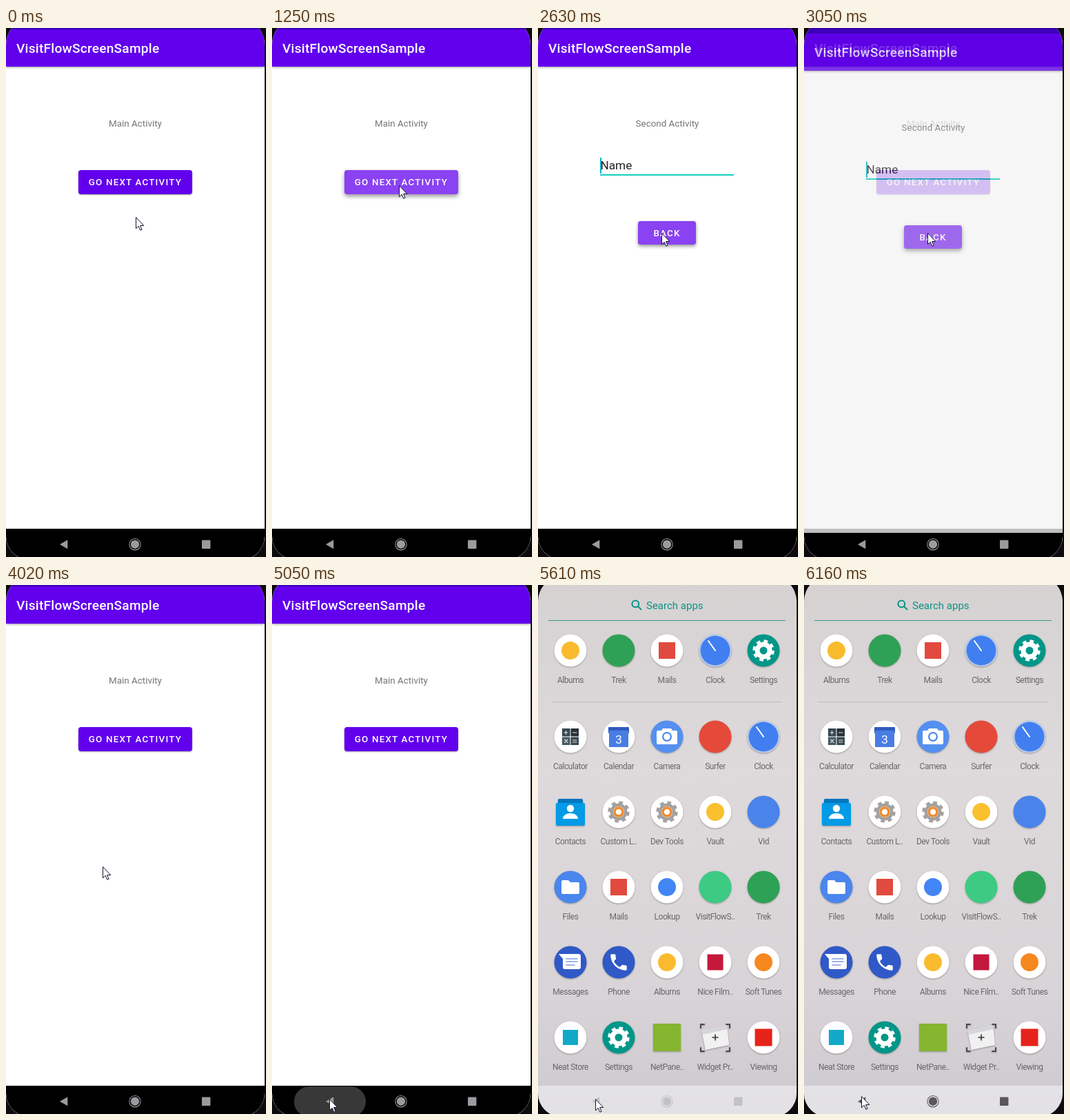
An HTML page for the animation above (6.49 s loop, 377x767 px).

```html
<!DOCTYPE html>
<html lang="en">
<head>
<meta charset="utf-8">
<title>Screen transition</title>
<style>
  :root { --loop: 6490ms; }
  html, body { margin: 0; width: 100%; height: 100%; overflow: hidden; background: #0d0b0e; }
  body { position: relative; font-family: Roboto, "Noto Sans", sans-serif; }
  #screen, .layer { position: absolute; left: 0; top: 0; width: 377px; height: 767px; }
  #screen { clip-path: inset(-14px 2px -4px 0 round 38px 38px 34px 34px); }

  /* launcher */
  #launcher { background: linear-gradient(#d6d2d2, #ded9db 35%, #d9d4d7 75%, #cdcad0); }
  #launcher text { font-family: Roboto, "Noto Sans", sans-serif; }
  .label { font-size: 12px; letter-spacing: -.45px; fill: #6a6769; text-anchor: middle; }
  .icon { filter: drop-shadow(0 1px 1px rgba(0, 0, 0, .3)); }

  /* app windows */
  #task { position: absolute; left: 0; top: -20px; width: 375px; height: 787px;
    animation: leave var(--loop) step-end infinite; }
  .window { position: absolute; inset: 0; background: #fff; }
  .window > * { position: absolute; }
  .status { inset: 0 0 auto; height: 22px; background: #3700b3; }
  .bar { inset: 22px 0 auto; height: 54px; padding-left: 15px; background: #6200ee; color: #fff;
    font: 500 19.1px/56px Roboto, "Noto Sans", sans-serif; letter-spacing: .0125em;
    box-shadow: 0 1px 3px rgba(0, 0, 0, .42); }
  .base { inset: 746px 0 0; background: #000; }
  .caption { left: 0; right: 0; top: 148px; text-align: center; color: #757577; font-size: 13.4px; line-height: 21px; }
  .btn { height: 34.6px; border-radius: 4px; background: #6200ee; color: #fff; text-align: center;
    font: 500 13.4px/35px Roboto, "Noto Sans", sans-serif; letter-spacing: .0893em;
    overflow: hidden; isolation: isolate; box-shadow: 0 1px 2px rgba(0, 0, 0, .4);
    animation: lift var(--loop) linear var(--wait, 0ms) infinite; }
  .btn::before { content: ""; position: absolute; z-index: -1; left: var(--x); top: var(--y);
    width: 190px; height: 190px; margin: -95px; border-radius: 50%; background: rgba(255, 255, 255, .26);
    animation: ripple var(--loop) linear var(--wait, 0ms) infinite; }
  #next { left: 104.7px; top: 226.2px; width: 165.3px; --x: 80px; --y: 22px; }
  #back { left: 145px; top: 299.8px; width: 84px; --x: 34px; --y: 17px; --wait: -4730ms; }
  .field { left: 90px; top: 207px; width: 194px; height: 25px; border-bottom: 2px solid #12d0bd;
    color: #232126; font-size: 17.2px; line-height: 25px; text-indent: .5px; }
  .caret { left: 90px; top: 208px; width: 2px; height: 23px; background: #03b5c5;
    animation: caret var(--loop) step-end infinite; }
  .dim { inset: 0; background: #000; animation: dim var(--loop) step-end infinite; }
  #second { animation: second var(--loop) step-end infinite; }

  /* navigation keys and pointer */
  #keys { color: #9d9a9f; animation: keys var(--loop) infinite; }
  #touch { position: absolute; left: 32px; top: 727px; width: 104px; height: 44px; border-radius: 22px;
    background: rgba(255, 255, 255, .22); animation: touch var(--loop) linear infinite; }
  #pointer { position: absolute; left: 0; top: 0; width: 14px; height: 22px;
    animation: pointer var(--loop) infinite; }

  @keyframes pointer {
    0% { transform: translate(188px, 274px); animation-timing-function: steps(3); }
    3.08% { transform: translate(184px, 228px); }
    25.57% { transform: translate(184px, 228px); animation-timing-function: steps(4); }
    29.89% { transform: translate(180px, 284px); animation-timing-function: steps(4); }
    34.2% { transform: translate(179px, 297px); }
    55.46% { transform: translate(179px, 297px); animation-timing-function: steps(2); }
    57.62% { transform: translate(165px, 291px); animation-timing-function: steps(4); }
    61.94% { transform: translate(140px, 408px); animation-timing-function: steps(4); }
    66.25% { transform: translate(43px, 640px); animation-timing-function: steps(2); }
    68.41% { transform: translate(93px, 731px); animation-timing-function: steps(1); }
    69.49% { transform: translate(83px, 745px); }
    92.75% { transform: translate(83px, 745px); animation-timing-function: steps(2); }
    94.91%, 100% { transform: translate(83px, 741px); }
  }
  @keyframes ripple {
    0%, 10.16% { opacity: 0; transform: scale(.25); }
    10.17% { opacity: 1; transform: scale(.25); animation-timing-function: steps(6); }
    16.6%, 20.33% { opacity: 1; transform: none; }
    24.65%, 100% { opacity: 0; transform: none; }
  }
  @keyframes lift {
    0%, 10.16% { box-shadow: 0 1px 2px rgba(0, 0, 0, .4); }
    14.5%, 20.33% { box-shadow: 0 3px 6px rgba(0, 0, 0, .42); }
    24.65%, 100% { box-shadow: 0 1px 2px rgba(0, 0, 0, .4); }
  }
  @keyframes second {
    0% { opacity: 0; transform: translateY(16px); }
    20.33% { opacity: .35; transform: translateY(16px); }
    21.41% { opacity: .7; transform: translateY(9px); }
    22.49% { opacity: .92; transform: translateY(4px); }
    23.57% { opacity: 1; transform: translateY(1px); }
    24.65% { opacity: 1; transform: none; }
    46.99% { opacity: .75; transform: translateY(6px); }
    48.07% { opacity: .5; transform: translateY(14px); }
    49.15% { opacity: .27; transform: translateY(24px); }
    50.23% { opacity: .1; transform: translateY(33px); }
    51.3%, 100% { opacity: 0; transform: translateY(61px); }
  }
  @keyframes dim {
    0% { opacity: 0; }
    20.33% { opacity: .08; }
    22.49% { opacity: .2; }
    46.99% { opacity: .15; }
    48.07% { opacity: .1; }
    49.15% { opacity: .05; }
    51.3%, 100% { opacity: 0; }
  }
  @keyframes caret {
    0% { opacity: 0; }
    40.36%, 100% { opacity: 1; }
  }
  @keyframes touch {
    0%, 72.56% { opacity: 0; transform: scale(.3); }
    72.57% { opacity: 1; transform: scale(.3); animation-timing-function: steps(4); }
    76.88%, 78% { opacity: 1; transform: none; }
    82.12%, 100% { opacity: 0; transform: none; }
  }
  @keyframes keys {
    0% { color: #9d9a9f; }
    81.04% { color: #9d9a9f; animation-timing-function: steps(3); }
    84.28% { color: #f7f7f7; animation-timing-function: steps(6); }
    90.75%, 100% { color: #5a5859; }
  }
  @keyframes leave {
    0% { opacity: 1; transform: none; }
    83.2% { opacity: 1; transform: translateY(52px); }
    84.28% { opacity: 1; transform: translateY(98px); }
    85.36% { opacity: .5; transform: translateY(108px); }
    86.44%, 100% { opacity: 0; transform: translateY(110px); }
  }
</style>
</head>
<body>
<div id="screen">
  <svg id="launcher" class="layer" viewBox="0 0 377 767">
    <g fill="none" stroke="#009688" stroke-width="2">
      <circle cx="141.3" cy="27.3" r="4.9"/>
      <path d="M145 31L150 36"/>
      <path d="M15 51.5H359" stroke="#3f958c" stroke-width="1.2"/>
    </g>
    <text x="157" y="35.3" font-size="15" fill="#0b9286">Search apps</text>
    <path d="M20 169.5H354" stroke="#c2bdc0"/>
    <rect y="726" width="377" height="41" fill="#fff" opacity=".42"/>
    <g id="grid"></g>
  </svg>

  <div id="task">
    <div class="window">
      <div class="base"></div>
      <div class="bar">VisitFlowScreenSample</div>
      <div class="status"></div>
      <div class="caption">Main Activity</div>
      <div class="btn" id="next">GO NEXT ACTIVITY</div>
      <div class="dim"></div>
    </div>
    <div class="window" id="second">
      <div class="base"></div>
      <div class="bar">VisitFlowScreenSample</div>
      <div class="status"></div>
      <div class="caption">Second Activity</div>
      <div class="field">Name</div>
      <div class="caret"></div>
      <div class="btn" id="back">BACK</div>
    </div>
  </div>

  <div id="touch"></div>
  <svg id="keys" class="layer" viewBox="0 0 377 767" fill="currentColor">
    <path d="M78 748.8L89.3 742.3V755.3Z"/>
    <circle cx="187" cy="748.7" r="6.2"/>
    <circle cx="187" cy="748.7" r="8.2" fill="none" stroke="currentColor" stroke-width="1.1"/>
    <rect x="284" y="742.6" width="12.4" height="12.4" rx="1"/>
  </svg>
  <svg id="pointer" viewBox="0 0 14 22">
    <path d="M.5 .6V16.8L4.2 13.3L6.8 19.3L9.1 18.3L6.6 12.5H11.8Z" fill="#fff" stroke="#15122c"/>
  </svg>
</div>

<script>
  const disc = (fill, r = 23.5) => `<circle r="${r}" fill="${fill}"/>`;
  const box = (x, y, w, h, fill, rx = 0) =>
    `<rect x="${x}" y="${y}" width="${w}" height="${h}" rx="${rx}" fill="${fill}"/>`;
  const path = (d, fill) => `<path d="${d}" fill="${fill}"/>`;
  const line = (d, color, w = 1.5) =>
    `<path d="${d}" fill="none" stroke="${color}" stroke-width="${w}" stroke-linecap="round"/>`;
  const ring = (r, color, w, dash = "none") =>
    `<circle r="${r}" fill="none" stroke="${color}" stroke-width="${w}" stroke-dasharray="${dash}"/>`;
  const gear = color => ring(9, color, 7) + ring(13.5, color, 4.5, "5.6 5");
  const dot = (color, r = 13) => disc("#fff") + disc(color, r);
  const tile = (color, s = 24) => disc("#fff") + box(-s / 2, -s / 2, s, s, color);

  const clock = disc("#b9cbea") + disc("#417ff0", 21.5) + line("M-10 -14L0 0", "#fff", 2);
  const settings = disc("#009688") + gear("#fff");
  const tools = disc("#fff") + gear("#a3a1a0") + disc("#fff", 8) + ring(6, "#ef8a2c", 3.5);
  const calculator = disc("#fff") + box(-12, -12, 11.5, 11.5, "#37474f") + box(.5, -12, 11.5, 11.5, "#263238") +
    box(-12, .5, 11.5, 11.5, "#455a64") + box(.5, .5, 11.5, 11.5, "#37474f") +
    line("M-9 -6H-4M-6.5 -8.5V-3.5M3.5 -6H9M-8.5 4L-4 8.5M-4 4L-8.5 8.5M3.5 5H9M3.5 8H9", "#e8eaec", 1.1);
  const calendar = disc("#fff") + box(-15, -14, 30, 9, "#2f5bbd", 1) + box(-14, -9, 28, 24, "#4a7de3", 1) +
    `<text y="9.5" font-size="17" fill="#fff" text-anchor="middle">3</text>`;
  const camera = disc("#5590f0") + path("M-6 -12H6L8 -9H13Q15 -9 15 -7V9Q15 11 13 11H-13Q-15 11 -15 9V-7Q-15 -9 -13 -9H-8Z", "#fff") +
    disc("#4a86ee", 7) + disc("#fff", 4.8);
  const contacts = box(-18, -19, 36, 12, "#0277bd", 2) + box(-21, -13, 42, 33, "#039be5", 2) +
    `<circle cy="-5" r="5.2" fill="#fff"/>` + path("M-11 10Q-10 2 0 2Q10 2 11 10Z", "#fff");
  const files = disc("#4a86ee") + path("M-12 -10H-3L0 -7H11Q13 -7 13 -5V8Q13 10 11 10H-11Q-13 10 -13 8V-8Z", "#fff");
  const messages = disc("#3059c8") + path("M-17 -12H12Q15 -12 15 -9V7Q15 10 12 10H-8Q-11 10 -11 7V-5Z", "#fff") +
    line("M-6 -5H10M-6 -1H10M-6 4H6", "#7f9ce0", 1.6);
  const phone = disc("#3059c8") + `<g transform="scale(1.3) translate(-12 -12)">` +
    path("M6.6 10.8C8 13.6 10.4 16 13.2 17.4L15.4 15.2Q15.9 14.7 16.4 14.9Q18 15.5 20 15.5Q21 15.5 21 16.5V20Q21 21 20 21C10.6 21 3 13.4 3 4Q3 3 4 3H7.5Q8.5 3 8.5 4Q8.5 6 9.1 7.6Q9.3 8.2 8.8 8.6Z", "#fff") + `</g>`;
  const widget = line("M-21 -14V-19H-16M16 -19H21V-14M21 15V20H16M-16 20H-21V15", "#4a4a4c", 2) +
    path("M-20 -10L17 -18L20 11L-14 18Z", "#f1f1f2") + path("M-20 -10L17 -18L17.8 -12L-19 -4Z", "#d6d6d9") +
    line("M0 -4V4M-4 0H4", "#333", 1.6);

  const apps = [
    ["Albums", dot("#f9bb2d")], ["Trek", disc("#2fa156")], ["Mails", tile("#e14a3e")], ["Clock", clock], ["Settings", settings],
    ["Calculator", calculator], ["Calendar", calendar], ["Camera", camera], ["Surfer", disc("#e5493a")], ["Clock", clock],
    ["Contacts", contacts], ["Custom L..", tools], ["Dev Tools", tools], ["Vault", dot("#f9c02f")], ["Vid", disc("#4a84ea")],
    ["Files", files], ["Mails", tile("#e14a3e")], ["Lookup", dot("#4285f4")], ["VisitFlowS..", disc("#3dcb83")], ["Trek", disc("#2fa156")],
    ["Messages", messages], ["Phone", phone], ["Albums", dot("#f9bb2d")], ["Nice Film..", tile("#c4183c", 23)], ["Soft Tunes", dot("#f7871f")],
    ["Neat Store", tile("#12a9c9", 22)], ["Settings", settings], ["NetPane..", box(-20, -20, 40, 40, "#86b52f")], ["Widget Pr..", widget], ["Viewing", tile("#e6231a", 25)]
  ];

  document.getElementById("grid").innerHTML = apps.map(([name, art], i) => {
    const row = Math.floor(i / 5), x = 47 + 70 * (i % 5);
    const y = row ? 111 + 109 * row : 95;
    return `<g transform="translate(${x} ${y})"><g class="icon">${art}</g>` +
      `<text class="label" y="47">${name}</text></g>`;
  }).join("");
</script>
</body>
</html>
```
